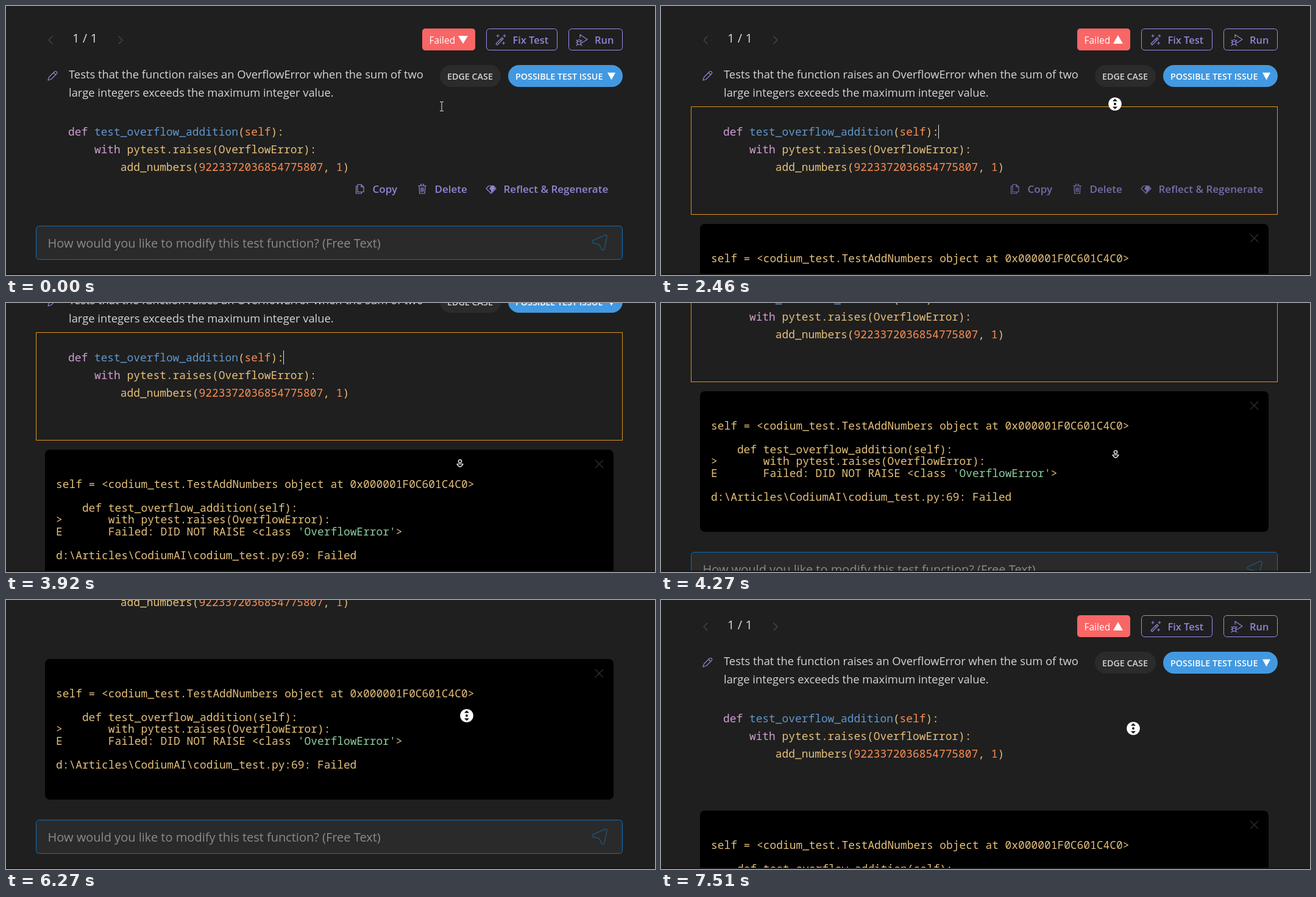
Write an HTML page that moves like this. It is 1065 by 442 pixels and loops after 8 s.

```html
<!DOCTYPE html>
<html lang="en">
<head>
<meta charset="utf-8">
<title>Test result panel</title>
<style>
  html, body { margin: 0; width: 100%; height: 100%; overflow: hidden; background: #1f1f1f; }
  svg { display: block; }
  text { font-family: "Open Sans", "Noto Sans", sans-serif; white-space: pre; }
  .prose { font-size: 18.35px; fill: #d6d6d6; }
  .code text { font: 500 17.89px "Noto Sans Mono", "DejaVu Sans Mono", monospace; fill: #e5c07b; }
  .code .kw { fill: #cf9fd2; }
  .code .fn { fill: #6196cc; }
  .code .num { fill: #fc8e52; }
  .code .str { fill: #8ccf9f; }
  .action { font-size: 17px; font-weight: 600; fill: #9484d6; }
  .button { font-size: 16.4px; }
  .chip { font-size: 14.3px; font-weight: 600; fill: #d4d4d4; }
  .line { fill: none; stroke: #9484d6; stroke-width: 1.2; stroke-linejoin: round; stroke-linecap: round; }
  .frame { fill: none; stroke: #a48bee; }
  .dim { stroke: #4b4b50; }
  .pan { fill: #1f1f1f; stroke: #fff; stroke-width: 1.2; stroke-linejoin: round; }
</style>
</head>
<body>
<svg width="1065" height="442" viewBox="0 0 1065 442">
  <g id="page">
    <path class="line dim" d="M76 50l-6 6 6 6M185 50l6 6-6 6"/>
    <text x="109" y="60" font-size="20.2" fill="#dadada">1 / 1</text>

    <rect x="683" y="37" width="87" height="36" rx="5" fill="#f96666"/>
    <text x="694.5" y="62" font-size="15.5" fill="#fff">Failed</text>
    <path id="toggle" fill="#fff"/>

    <rect class="frame" x="788.5" y="37.5" width="116" height="35" rx="5"/>
    <path class="line" d="M804 62l10-10 2 2-10 10zM811.500 54.500l2 2M807 47v4M805 49h4M818 47v4M816 49h4M816.500 59v4M814.500 61h4"/>
    <text class="action button" x="831.500" y="62">Fix Test</text>

    <rect class="frame" x="923.5" y="37.5" width="88" height="35" rx="5"/>
    <path class="line" d="M942 52v-5l12 8-8 5M937.500 58.500q0-3 3-3t3 3v2q0 3-3 3t-3-3zM937.500 58.500h6M936 56l1.500 2M945 56l-1.500 2M935.500 60.500h2M943.500 60.500h2M936 65l2-2M945 65l-2-2"/>
    <text class="action button" x="966" y="62">Run</text>

    <path class="line" d="M69 122l1.500-5 9-9q2-1.500 3.500 0t0 3.500l-9 9zM78 109.500l3.500 3.500"/>
    <text class="prose" x="103" y="119">Tests that the function raises an OverflowError when the sum of two</text>
    <text class="prose" x="103" y="149">large integers exceeds the maximum integer value.</text>

    <rect x="712" y="97" width="100" height="36" rx="18" fill="#2b2b2b"/>
    <text class="chip" x="724" y="120.500">EDGE CASE</text>
    <rect x="824" y="97" width="188" height="36" rx="18" fill="#4299e1"/>
    <text class="chip" x="836" y="120.500" style="fill:#fff">POSSIBLE TEST ISSUE</text>
    <path d="M987 109.500h13l-6.500 12z" fill="#fff"/>

    <g class="code">
      <text x="102" y="213"><tspan class="kw">def</tspan> <tspan class="fn">test_overflow_addition</tspan>(<tspan class="num">self</tspan>):</text>
      <text x="102" y="242">    <tspan class="kw">with</tspan> pytest.raises(OverflowError):</text>
      <text x="102" y="271">        add_numbers(<tspan class="num">9223372036854775807</tspan>, <tspan class="num">1</tspan>)</text>
    </g>
    <path id="caret" d="M455.500 195v23" stroke="#ddd"/>
    <rect id="focus" x="49.500" y="165.500" width="962" height="177" fill="none" stroke="#dc941e"/>

    <g id="actions">
      <path class="line" d="M577 293.500h6l4 4v8h-10zM583 293.500v4h4M577 296h-2.500v12h9v-2.500"/>
      <text class="action" x="601.500" y="307">Copy</text>
      <path class="line" d="M676.500 295.500h13M680.500 295.500v-2.500h5v2.500M678 295.500l.7 12.500h8.600l.7-12.500M681 298.500v6.500M683 298.500v6.500M685 298.500v6.500"/>
      <text class="action" x="703.500" y="307">Delete</text>
      <path class="line" d="M792 295.500h8l4 4.500-8 8-8-8z"/>
      <path d="M796 296h4l2.500 4-6.500 7v-4l-3-3z" fill="#9484d6"/>
      <text class="action" x="816.500" y="307">Reflect &amp; Regenerate</text>
    </g>

    <g id="panel" class="code">
      <rect x="64" y="358" width="933" height="231" rx="8" fill="#000"/>
      <path d="M967 375l13 13M980 375l-13 13" stroke="#263038" stroke-width="1.400"/>
      <text x="82" y="420.500">self = &lt;codium_test.TestAddNumbers object at 0x000001F0C601C4C0&gt;</text>
      <text x="82" y="459.500">    def test_overflow_addition(self):</text>
      <text x="82" y="479">&gt;       with pytest.raises(OverflowError):</text>
      <text x="82" y="498.500">E       Failed: DID NOT RAISE &lt;class <tspan class="str">'OverflowError'</tspan>&gt;</text>
      <text x="82" y="537.500">d:\Articles\CodiumAI\codium_test.py:69: Failed</text>
    </g>

    <g id="prompt">
      <rect x="49.500" y="361.500" width="962" height="55" rx="5" fill="#2a2a2a" stroke="#0f70bd"/>
      <text x="68.500" y="397" font-size="20" fill="#8b8b8b">How would you like to modify this test function? (Free Text)</text>
      <path d="M963 385.500l20-9q3.500-1 3 2.500l-4 20q-1 3-4 1.500l-5-9-9-2q-3.500-2-1-4z" fill="none" stroke="#24485f" stroke-width="2" stroke-linejoin="round"/>
    </g>
  </g>
  <rect y="440" width="1065" height="2" fill="#171717"/>

  <g id="cursor">
    <path id="beam" d="M-3 -7.500h2.500l.5.5.5-.5h2.500M-3 7.500h2.500l.5-.5.5.5h2.500M0 -7v14" fill="none" stroke="#e8e8e8"/>
    <path id="arrow" d="M0 0v16l3.800-3.500 2.700 6 2.400-1-2.600-5.800h5.200z" fill="#fff" stroke="#000" stroke-width=".8"/>
    <path id="hand" d="M-2 0q0-2 2-2t2 2v6q2-1.500 3.500.5 2-1 3 1 2-.5 2 2v5q0 3-2 6v1.500h-9v-2l-6-8q-1.500-3 1-3l3 2.500z" fill="#fff" stroke="#000"/>
    <g id="ring">
      <circle r="10.800" fill="#fff"/>
      <path d="M0 -8.500l4 4h-8zM0 8.500l4-4h-8z"/>
      <circle r="1.900"/>
    </g>
    <g id="south" class="pan">
      <circle cy="-3" r="2.700"/>
      <path d="M-5 1.500h10q-1 3-5 5-4-2-5-5z"/>
    </g>
    <g id="north" class="pan">
      <circle cy="3.500" r="2.700"/>
      <path d="M-5 -1h10q-1-3-5-5-4 2-5 5z"/>
    </g>
  </g>
</svg>
<script>
const LOOP = 8000, STEP = 70;
const OPEN = 890, FOCUS = 2460, RELEASE = 5280, REPRESS = 5410, BLUR = 6270;

// Each burst of movement advances in its own 70 ms steps.
const bursts = [0, OPEN, 1980, FOCUS, 2870, 3710, 4550, RELEASE, REPRESS, BLUR, 6320, 7090];

const scroll = [
  [3010, 0], [3150, 1], [3360, 10], [3500, 24], [3640, 47], [3920, 117],
  [4200, 192], [4410, 254], [4480, 261],
  [6400, 261], [6600, 256], [6810, 225], [7020, 155], [7160, 100],
  [7300, 52], [7440, 17], [7510, 12]
];
const pointer = [
  [0, 715, 165], [560, 742, 55], [1910, 742, 55], [2260, 745, 161],
  [2800, 745, 161], [3360, 745, 248], [3640, 745, 262], [3920, 745, 263],
  [4480, 747, 241], [4690, 756, 190], [6250, 756, 190],
  [6810, 767, 59], [6950, 768, 70], [7510, 775, 211]
];
const shapes = [
  [0, 'beam'], [140, 'arrow'], [420, 'hand'], [2050, 'arrow'], [FOCUS, 'ring'],
  [2940, 'south'], [4690, 'ring'], [RELEASE, 'arrow'], [REPRESS, 'ring'],
  [6340, 'north'], [7510, 'ring']
];

const el = id => document.getElementById(id);
const show = (id, on) => { el(id).style.display = on ? '' : 'none'; };
const move = (id, x, y) => el(id).setAttribute('transform', `translate(${x} ${y})`);
const clamp = p => Math.max(0, Math.min(1, p));
const smooth = p => p * p * (3 - 2 * p);

function track(keys, t, col = 1, ease = p => p) {
  const i = keys.findIndex(k => k[0] > t);
  if (i === 0) return keys[0][col];
  if (i < 0) return keys[keys.length - 1][col];
  const a = keys[i - 1], b = keys[i];
  return a[col] + (b[col] - a[col]) * ease((t - a[0]) / (b[0] - a[0]));
}

function quantise(t) {
  const start = bursts.findLast(b => b <= t);
  return start + Math.floor((t - start) / STEP) * STEP;
}

function draw(now) {
  const t = quantise(now);
  const open = t >= OPEN;

  move('page', 0, -Math.round(track(scroll, t)));
  move('prompt', 0, open ? 261 : 0);
  el('toggle').setAttribute('d', open ? 'M742 62h16l-8-14z' : 'M742 49h16l-8 13z');

  show('panel', open);
  el('panel').style.opacity = Math.sin(clamp((t - OPEN + 10) / 500) * Math.PI / 2);

  const released = t >= RELEASE && t < REPRESS;
  el('actions').style.opacity = t < FOCUS || released ? 1 : 0.75 * clamp((2670 - t) / 210);

  const focused = t >= FOCUS && t < BLUR;
  show('focus', focused);
  show('caret', focused && Math.floor((t - FOCUS) / 500) % 2 === 0);

  const shape = shapes.findLast(s => s[0] <= t)[1];
  for (const id of ['beam', 'arrow', 'hand', 'ring', 'south', 'north']) show(id, id === shape);
  move('cursor', Math.round(track(pointer, t, 1, smooth)), Math.round(track(pointer, t, 2, smooth)));
}

const start = performance.now();
function tick() {
  draw((performance.now() - start) % LOOP);
  requestAnimationFrame(tick);
}
tick();
</script>
</body>
</html>
```
